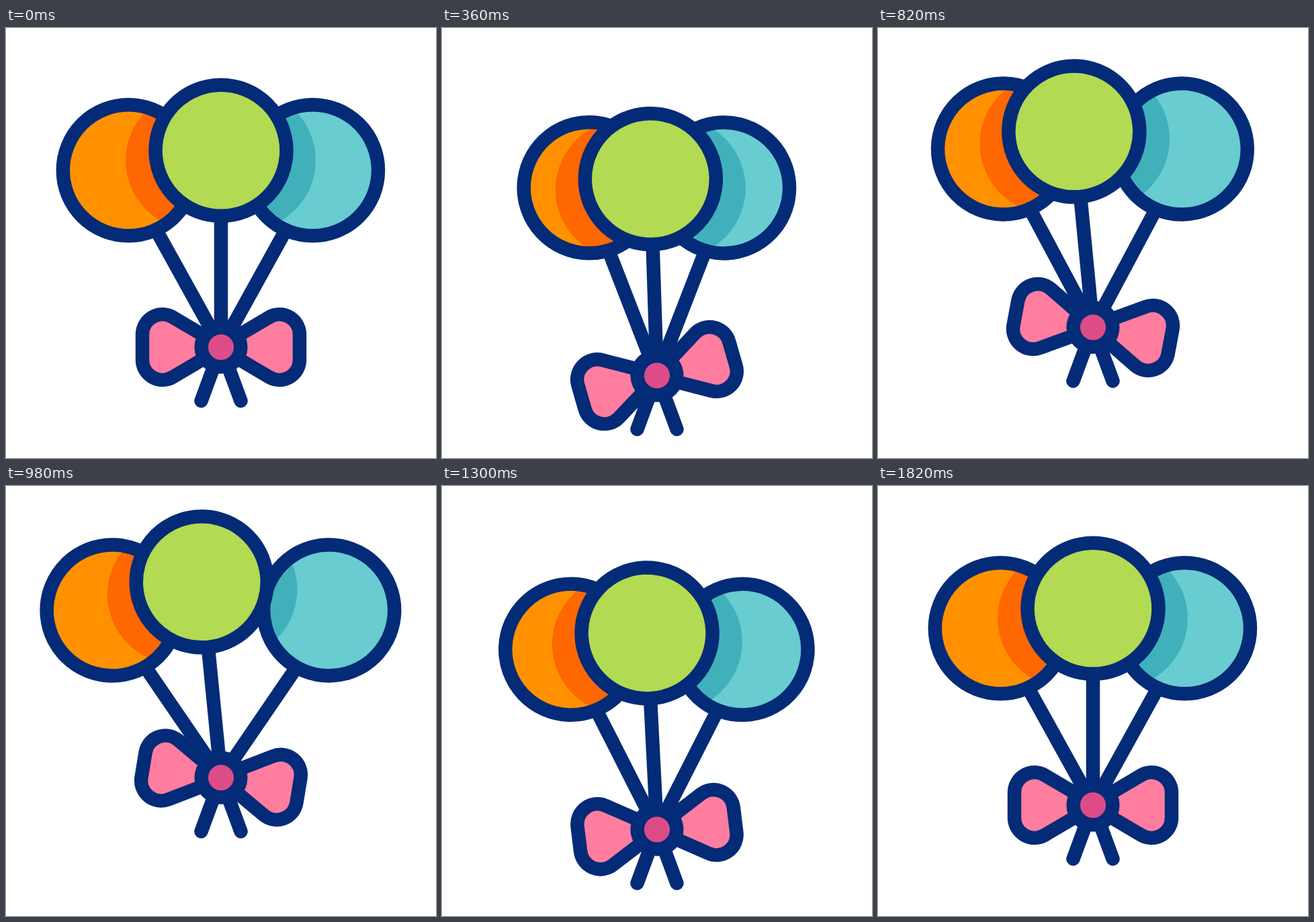
Recreate the animation shown at these times as an HTML page. Size 640 px wide and 640 px high, loop 2.4 s.

```html
<!DOCTYPE html>
<html lang="en">
<head>
<meta charset="utf-8">
<title>Balloons</title>
<style>
  html, body { margin: 0; height: 100%; overflow: hidden; background: #fff; }
  svg { display: block; width: 100%; height: 100%; }
  .line { fill: none; stroke: #042b77; stroke-width: 20.5; stroke-linecap: round; stroke-linejoin: round; }
</style>
</head>
<body>
<svg viewBox="0 0 640 640">
  <defs>
    <clipPath id="leftClip"><circle cx="182.3" cy="211.8" r="97.5"/></clipPath>
    <clipPath id="rightClip"><circle cx="456.5" cy="211.8" r="97.5"/></clipPath>
    <path id="loop" d="M340 461L391.5 430.6A30 30 0 0 1 437 456.5V493.5A30 30 0 0 1 391.5 519.4L340 489Z"/>
  </defs>
  <g id="bunch">
    <path class="line" d="M290.5 555L320 475L349.5 555"/>
    <g id="left">
      <path class="line" d="M320 475L227 307"/>
      <g clip-path="url(#leftClip)">
        <circle cx="182.3" cy="211.8" r="97.5" fill="#ff9100"/>
        <circle id="leftShade" cx="282" cy="197" r="104" fill="#ff6700"/>
      </g>
      <circle class="line" cx="182.3" cy="211.8" r="97.5"/>
    </g>
    <g id="right">
      <path class="line" d="M320 475L413 307"/>
      <g clip-path="url(#rightClip)">
        <circle cx="456.5" cy="211.8" r="97.5" fill="#68ccd1"/>
        <circle id="rightShade" cx="357" cy="197" r="104" fill="#40b1ba"/>
      </g>
      <circle class="line" cx="456.5" cy="211.8" r="97.5"/>
    </g>
    <g id="middle">
      <path class="line" d="M320 475V182"/>
      <circle class="line" cx="320" cy="182.3" r="97.5" style="fill:#b2da52"/>
    </g>
    <g id="bow" class="line" style="fill:#ff7d9f">
      <use href="#loop"/>
      <use href="#loop" transform="translate(640 0) scale(-1 1)"/>
    </g>
    <circle class="line" cx="320" cy="475" r="29.3" style="fill:#dc4d88"/>
  </g>
</svg>
<script>
const LOOP = 2400, START = 8;

// Each track is a list of [time, value] with smooth easing between them.
const tracks = {
  lift: [[START, 0], [522, 55], [921, -45.3], [1356, 40], [1814, 0]],
  sway: [[START, 0], [925, -5.72], [1687, 0]],
  close: [[START, 0], [573, 11.4], [1000, -5.5], [1333, 2.25], [1814, 0]],
  twist: [[START, 0], [450, -18], [882, 12.2], [1290, -7], [1814, 0]]
};

function valueAt(track, t) {
  if (t <= track[0][0]) return track[0][1];
  for (let i = 1; i < track.length; i++) {
    const [t0, a] = track[i - 1], [t1, b] = track[i];
    if (t < t1) {
      const s = (t - t0) / (t1 - t0);
      return a + (b - a) * s * s * (3 - 2 * s);
    }
  }
  return track[track.length - 1][1];
}

const place = (id, transform) =>
  document.getElementById(id).setAttribute("transform", transform);
const turn = (id, angle) => place(id, `rotate(${angle} 320 475)`);

function draw() {
  const t = performance.now() % LOOP;
  const lift = valueAt(tracks.lift, t);
  const sway = valueAt(tracks.sway, t);
  const close = valueAt(tracks.close, t);

  place("bunch", `translate(0 ${lift})`);
  turn("left", close);
  turn("right", -close);
  turn("middle", sway);
  // The shades follow the middle balloon.
  turn("leftShade", sway - close);
  turn("rightShade", sway + close);
  turn("bow", valueAt(tracks.twist, t));
  requestAnimationFrame(draw);
}
draw();
</script>
</body>
</html>
```
